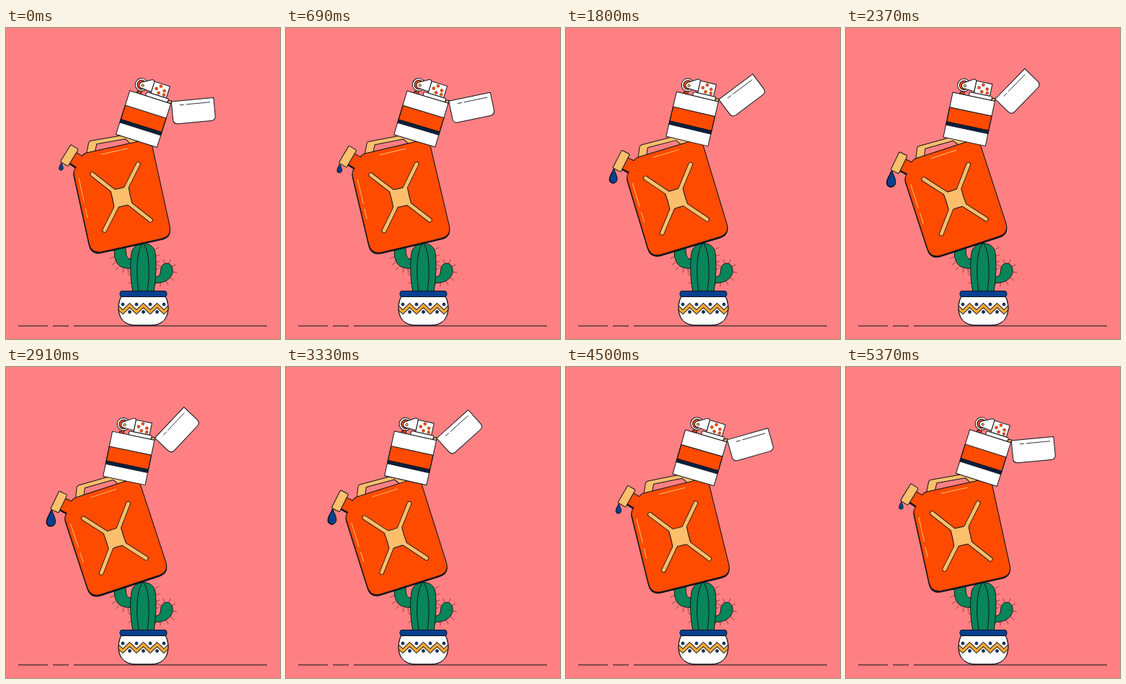
An HTML page that plays this animation: 380x431 px, repeating every 5400 ms.

```html
<!DOCTYPE html>
<html lang="en">
<head>
<meta charset="utf-8">
<title>Balancing act</title>
<style>
  html, body { margin: 0; width: 100%; height: 100%; overflow: hidden; background: #fe8082; }
  svg { display: block; width: 100vw; height: 100vh; }
  .ink { stroke: #10131c; stroke-width: 1; stroke-linejoin: round; }
  .line { fill: none; stroke: #10131c; stroke-width: 1; stroke-linecap: round; }
  .white { fill: #fff; }
  .orange { fill: #ff4b00; }
  .tan { fill: #fdbf6c; }
  .green { fill: #09855a; }
  .blue { fill: #06408f; }
  .navy { fill: #04203f; }
</style>
</head>
<body>
<svg viewBox="0 0 380 431">
  <defs>
    <path id="can" d="M-57.6 -44Q-57.6 -50 -52.5 -54L-60 -62L-48 -74L-41 -67.5Q-38 -70.5 -34 -70.5H45Q57 -70.5 57 -58V53Q57 68 42 68H-42Q-57.6 68 -57.6 53Z"/>
    <path id="arms" d="M-32.6 -39.8L32.6 39.8M32.6 -39.8L-32.6 39.8"/>
    <path id="bowl" d="M160 372C153 384 153 412 180 412H201C228 412 228 384 221 372Z"/>
    <path id="tear" d="M0 0C2 6 6 11 6 16.5A6 6.3 0 0 1 -6 16.5C-6 11 -2 6 0 0Z"/>
    <clipPath id="inBowl"><use href="#bowl"/></clipPath>
  </defs>

  <path class="line" style="stroke-linecap:butt" d="M17 412.9H58M65 412.9H87M94 412.9H362"/>

  <!-- cactus -->
  <path class="line" style="stroke:#7d2f35;stroke-width:.8" d="M150 309l-4 -2M150 317l-5 2M152 325l-5 3M156 331l-3 4M163 334l-1 5M169 334l1 5M174 343l-4 -2M174 352l-4 2M207 307l5 -3M208 316l5 -2M208 325l5 -2M208 335l4 -2M215 331l-5 -3M220 326l-2 -5M226 326l2 -5M230 331l5 -3M231 338l6 1M228 346l5 4M222 351l3 5M214 353l0 5M208 353l-2 4"/>
  <g class="ink">
    <path class="green" d="M151 300C148.500 320 152 335 175 333V320C166 321 166 314 166 298Z"/>
    <path class="green" d="M205 353C222 355 232 345 231 335C230 323.500 217 323.500 215 333C214 343 213 345 205 345Z"/>
    <path class="green" d="M176 366C172 345 172 325 174 312C177 294 205 294 207 312C209 325 208 345 205 366Z"/>
  </g>
  <path class="line" d="M190 298C181 306 180 340 184 365M190 298C199 306 200 340 196 365"/>

  <!-- pot -->
  <use href="#bowl" class="ink white"/>
  <g clip-path="url(#inBowl)">
    <path id="zigEdge" class="line" style="stroke-width:5.4;stroke-linecap:butt;stroke-linejoin:miter"/>
    <path id="zigFill" class="line" style="stroke:#f7a935;stroke-width:3.6;stroke-linecap:butt;stroke-linejoin:miter"/>
    <g id="potDots" class="ink blue"></g>
  </g>
  <use href="#bowl" class="line"/>
  <rect class="ink blue" x="158" y="364.5" width="65" height="8" rx="3.2"/>

  <g id="stack">
    <g id="drop">
      <use href="#tear" x="-.8" y=".6" class="ink" fill="#10131c"/>
      <use href="#tear" class="ink blue"/>
    </g>

    <!-- jerrycan -->
    <g transform="translate(160 234.5) rotate(-12.4)">
      <path class="ink tan" fill-rule="evenodd" d="M-34 -70L-28 -83.5Q-27 -85.5 -24 -85.4L28 -83.2Q30 -83 31 -81.5L40 -70ZM-22 -70L-17.5 -79.3L23 -77.6L28 -70Z"/>
      <use href="#can" class="ink" x="-.5" y="1.6" fill="#10131c"/>
      <use href="#can" class="ink orange"/>
      <rect class="ink tan" x="-13.8" y="-6.2" width="27.6" height="12.4" rx="1.5" transform="translate(-58 -72) rotate(-46)"/>
      <path class="line" style="stroke:#fdbf6c" d="M-14 -64H23M-52 -38V-4M-52 4V18"/>
      <use href="#arms" class="line" style="stroke-width:6.4"/>
      <path class="ink tan" d="M-12.8 -12.8Q0 -12 12.8 -12.8Q12 0 12.8 12.8Q0 12 -12.8 12.8Q-12 0 -12.8 -12.8Z"/>
      <use href="#arms" class="line" style="stroke:#fdbf6c;stroke-width:4.8"/>
    </g>

    <!-- lighter -->
    <g transform="translate(190.6 126) rotate(17.6)">
      <path class="ink orange" d="M-20 -31.5V-34H-17.5V-37H-14V-31.5Z"/>
      <circle class="ink white" cx="-16.8" cy="-44.5" r="8.8"/>
      <circle class="ink orange" cx="-16.6" cy="-44.4" r="6.3"/>
      <rect class="ink white" x="-1" y="-54" width="22.5" height="17"/>
      <g id="vents" class="orange" style="stroke:#7a2a10;stroke-width:.5"></g>
      <path class="ink white" d="M-17 -48L-5 -55.3Q-2 -56.5 -1 -53.5V-39L-15 -39.9A4.2 4.2 0 0 1 -17 -48Z"/>
      <circle class="ink tan" cx="-15" cy="-44" r="1.7" style="stroke-width:.7"/>
      <rect class="ink white" x="-7" y="-37" width="32" height="5.5" rx="1.5"/>
      <path class="ink tan" d="M24.5 -31.5Q25 -36 30 -35.5L29.5 -31.5Z"/>
      <rect class="white" x="-29.8" y="-31.6" width="59.6" height="63.4"/>
      <rect class="ink orange" x="-29.8" y="-10.5" width="59.6" height="20.5"/>
      <rect class="ink navy" x="-29.8" y="10" width="59.6" height="4.5"/>
      <rect class="line" x="-29.8" y="-31.6" width="59.6" height="63.4"/>
    </g>

    <g id="lid">
      <path class="ink white" d="M0 0H58.8V25Q58.8 31.5 52.3 31.5H6.5Q0 31.5 0 25Z"/>
      <path class="line" style="stroke-width:.8" d="M11.5 5.8H17M20.5 5.8H53"/>
    </g>
  </g>
</svg>
<script>
  const LOOP = 5400, STEP = 30;
  const el = id => document.getElementById(id);
  const pose = (id, transform) => el(id).setAttribute('transform', transform);
  const dots = (id, r, points) => {
    el(id).innerHTML = points.map(([x, y]) => `<circle cx="${x}" cy="${y}" r="${r}"/>`).join('');
  };

  // Zigzag band, symmetric about the pot's axis, with a dot in every notch
  const notches = Array.from({ length: 9 }, (_, i) => ({ x: 190.5 + (i - 4) * 9.5, low: i % 2 }));
  const zigzag = 'M' + notches.map(n => `${n.x} ${n.low ? 393.5 : 384.5}`).join('L');
  el('zigEdge').setAttribute('d', zigzag);
  el('zigFill').setAttribute('d', zigzag);
  dots('potDots', 1.9, notches.map(n => [n.x, n.low ? 383 : 393.5]));
  dots('vents', 2, [[9.5, -50.5], [4.5, -45.5], [16, -45.8], [9.3, -40.7], [17, -40.3]]);

  function draw() {
    const t = Math.floor(performance.now() % LOOP / STEP) * STEP;
    const p = (1 - Math.cos(2 * Math.PI * t / LOOP)) / 2;
    const lean = 5.9 * p;
    pose('stack', `rotate(${-lean} 183 326)`);
    pose('lid', `translate(229.3 102) rotate(${-5.4 - 36 * p})`);
    pose('drop', `translate(77 186.5) rotate(${lean + 2.5}) scale(${0.46 + 0.54 * p})`);
    requestAnimationFrame(draw);
  }
  draw();
</script>
</body>
</html>
```
